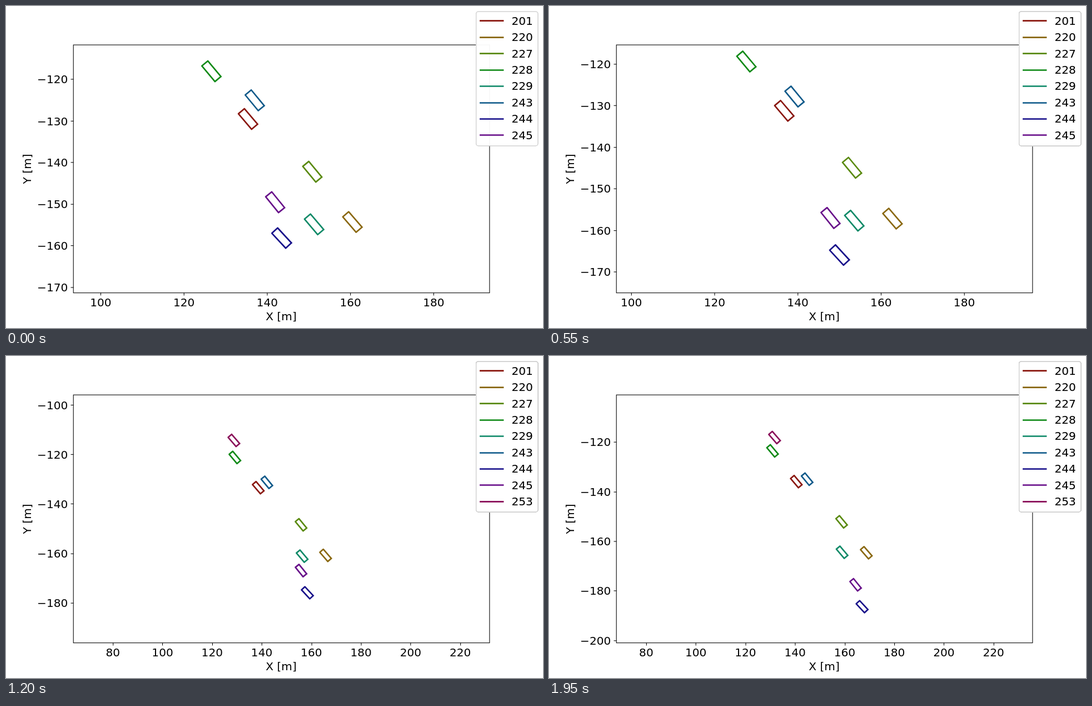
Animation, 966 px wide and 580 px high, one loop 2000 ms. Source, as an HTML page with a canvas:

```html
<!DOCTYPE html>
<html lang="en">
<head>
<meta charset="utf-8">
<title>Vehicle tracks</title>
<style>
html, body { margin: 0; width: 100%; height: 100%; overflow: hidden; background: #fff; }
canvas { display: block; width: 966px; height: 580px; }
</style>
</head>
<body>
<canvas id="plot" width="966" height="580"></canvas>
<script>
const ctx = document.getElementById('plot').getContext('2d');
const STEP = 50, STEPS = 40, JOIN = 15;

// The figure is laid out on 1000 x 600 units and scaled to the stage
const WIDTH = 1000, HEIGHT = 600, PT = 100 / 72;
const LEFT = 125, RIGHT = 900, TOP = 72, BOTTOM = 534;
const CX = (LEFT + RIGHT) / 2, CY = (TOP + BOTTOM) / 2;
const EM = 15 * PT, THIN = 0.8 * PT, THICK = 2 * PT, TICK = 3.5 * PT;
const CAR_LENGTH = 4.9, CAR_WIDTH = 1.88, SPAN = 100;

// Waypoints in metres, reached at these steps
const KEYS = [0, 11, 16, 24, 39];
const cars = [
  { id: 201, deg: 49.6, x: [135.38, 136.74, 137.43, 138.58, 140.48], y: [-129.58, -131.27, -132.17, -133.51, -135.99] },
  { id: 220, deg: 49.2, x: [160.47, 162.74, 163.93, 165.72, 168.70], y: [-154.35, -157.19, -158.66, -160.81, -164.67] },
  { id: 227, deg: 50.3, x: [150.83, 153.02, 154.12, 155.83, 158.74], y: [-142.26, -144.96, -146.39, -148.49, -152.20] },
  { id: 228, deg: 50.0, x: [126.58, 127.63, 128.20, 129.17, 130.90], y: [-118.10, -119.41, -120.19, -121.32, -123.58] },
  { id: 229, deg: 49.6, x: [151.26, 153.56, 154.72, 156.27, 158.94], y: [-154.90, -157.68, -159.13, -161.12, -164.47] },
  { id: 243, deg: 50.4, x: [137.00, 139.20, 140.27, 142.05, 144.85], y: [-125.09, -127.84, -129.32, -131.36, -135.00] },
  { id: 244, deg: 47.3, x: [143.47, 150.02, 153.42, 158.38, 167.00], y: [-158.21, -165.94, -170.02, -175.90, -186.42] },
  { id: 245, deg: 51.0, x: [141.90, 147.85, 151.14, 155.83, 164.38], y: [-149.59, -157.04, -161.13, -166.95, -177.60] },
  { id: 253, deg: 49.2, x: [123.40, 125.85, 126.99, 128.77, 131.73], y: [-108.10, -111.00, -112.33, -114.45, -118.20] }
];
cars.forEach((car, i) => { car.color = `hsl(${3.6 + 40 * i}, 80%, 30%)`; });

const snap = v => Math.floor(v + 0.5) + 0.5;
const mean = list => list.reduce((a, b) => a + b, 0) / list.length;
const visible = k => k < JOIN ? cars.slice(0, 8) : cars;

function along(values, k) {
  let i = 0;
  while (i < KEYS.length - 2 && k > KEYS[i + 1]) i++;
  const f = (k - KEYS[i]) / (KEYS[i + 1] - KEYS[i]);
  return values[i] + (values[i + 1] - values[i]) * f;
}

function line(x1, y1, x2, y2) {
  ctx.beginPath();
  ctx.moveTo(x1, y1);
  ctx.lineTo(x2, y2);
  ctx.stroke();
}

function text(str, x, y, align) {
  ctx.textAlign = align;
  ctx.fillText(str, x, y);
}

function drawCar(car, px, py, scale) {
  const a = car.deg * Math.PI / 180, c = Math.cos(a), s = Math.sin(a);
  const l = CAR_LENGTH * scale / 2, w = CAR_WIDTH * scale / 2;
  ctx.beginPath();
  for (const [u, v] of [[1, -1], [-1, -1], [-1, 1], [1, 1], [1, -1]]) {
    ctx.lineTo(px + u * l * c - v * w * s, py + u * l * s + v * w * c);
  }
  ctx.strokeStyle = car.color;
  ctx.stroke();
}

function drawAxes(mx, my, scale) {
  ctx.strokeStyle = ctx.fillStyle = '#000';
  ctx.lineWidth = THIN;
  ctx.lineCap = 'butt';
  const l = snap(LEFT), r = snap(RIGHT), t = snap(TOP), b = snap(BOTTOM);
  ctx.strokeRect(l, t, r - l, b - t);

  const halfX = (RIGHT - LEFT) / 2 / scale, halfY = (BOTTOM - TOP) / 2 / scale;
  for (let v = Math.ceil((mx - halfX) / 20) * 20; v <= mx + halfX; v += 20) {
    const x = CX + (v - mx) * scale;
    line(snap(x), b, snap(x), b + TICK);
    text(String(v), x, 560, 'center');
  }
  const stepY = scale > 6 ? 10 : 20;
  for (let v = Math.ceil((my - halfY) / stepY) * stepY; v <= my + halfY; v += stepY) {
    const y = CY - (v - my) * scale;
    line(l, snap(y), l - TICK, snap(y));
    text('\u2212' + Math.abs(v), LEFT - 2 * TICK, Math.round(y + 8), 'right');
  }
  text('X [m]', CX, 585, 'center');
  ctx.save();
  ctx.translate(47, CY + 0.5);
  ctx.rotate(-Math.PI / 2);
  text('Y [m]', 0, 0, 'center');
  ctx.restore();
}

function drawLegend(list) {
  const pad = 0.4 * EM, row = 20 + 0.5 * EM;
  const right = WIDTH - 0.5 * EM, top = 0.5 * EM;
  const left = right - 114.8, bottom = top + list.length * row - 0.5 * EM + 2 * pad;
  const x = left + pad, base = top + pad + 16;

  ctx.beginPath();
  ctx.roundRect(snap(left), snap(top), snap(right) - snap(left), snap(bottom) - snap(top), 0.2 * EM);
  ctx.fillStyle = 'rgba(255, 255, 255, 0.8)';
  ctx.fill();
  ctx.strokeStyle = 'rgba(204, 204, 204, 0.8)';
  ctx.lineWidth = PT;
  ctx.stroke();
  ctx.lineWidth = THICK;
  ctx.lineCap = 'square';
  ctx.fillStyle = '#000';
  list.forEach((car, i) => {
    const y = snap(base - 0.35 * EM + row * i);
    ctx.strokeStyle = car.color;
    line(snap(x), y, snap(x + 2 * EM), y);
    text(String(car.id), x + 2.8 * EM, Math.round(base + row * i), 'left');
  });
}

function draw(k) {
  const shown = visible(k);
  const xs = shown.map(car => along(car.x, k));
  const ys = shown.map(car => along(car.y, k));
  const mx = mean(xs), my = mean(ys);
  const scale = (k < JOIN ? RIGHT - LEFT : BOTTOM - TOP) / SPAN;

  ctx.setTransform(966 / WIDTH, 0, 0, 580 / HEIGHT, 0, 0);
  ctx.fillStyle = '#fff';
  ctx.fillRect(0, 0, WIDTH, HEIGHT);
  ctx.font = `${EM}px "DejaVu Sans", sans-serif`;
  ctx.save();
  ctx.beginPath();
  ctx.rect(LEFT, TOP, RIGHT - LEFT, BOTTOM - TOP);
  ctx.clip();
  ctx.lineWidth = THICK;
  ctx.lineJoin = 'round';
  ctx.lineCap = 'square';
  shown.forEach((car, i) => drawCar(car, CX + (xs[i] - mx) * scale, CY - (ys[i] - my) * scale, scale));
  ctx.restore();
  drawAxes(mx, my, scale);

  // Every step lays one more translucent legend over the earlier ones
  for (let i = -1; i <= k; i++) drawLegend(visible(i));
}

const start = performance.now();
let last = -1;
function tick() {
  const k = Math.floor((performance.now() - start) / STEP) % STEPS;
  if (k !== last) draw(last = k);
  requestAnimationFrame(tick);
}
tick();
</script>
</body>
</html>
```
